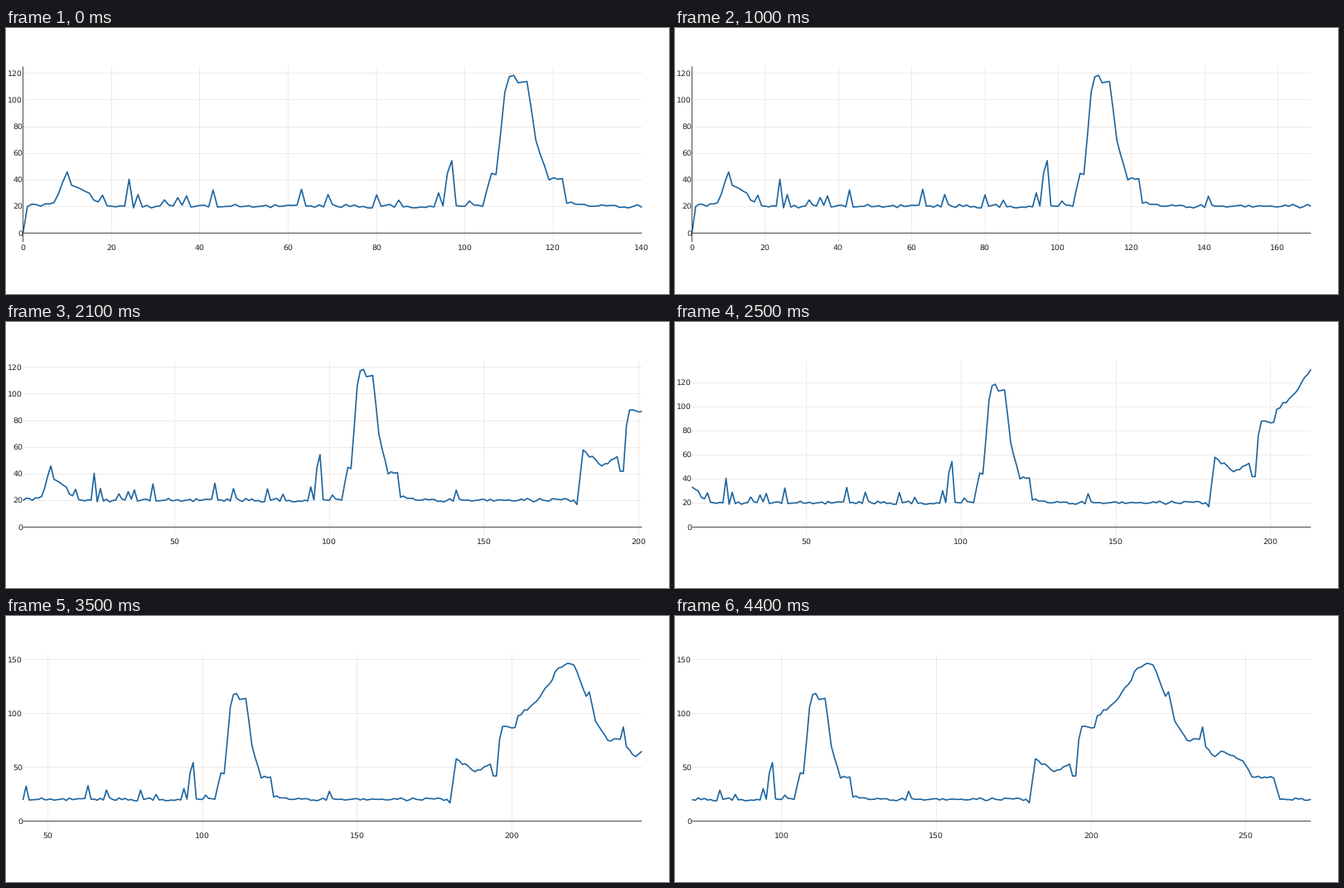
A matplotlib script for the animation above (4500 ms loop, 800x321 px).

```python
import numpy as np
import matplotlib.pyplot as plt
from matplotlib.animation import FuncAnimation

W, H, DPI = 800, 321, 100
LEFT, RIGHT, TOP, BOTTOM = 20.5, 767.3, 46.5, 258.2
FRAMES, INTERVAL = 45, 100
SAMPLES, WINDOW, QUIET = 272, 200, 20.3
BLUE, DARK, GRID, INK = "#1c649f", "#4a4a4a", "#ebebeb", "#222222"

plt.rcParams["font.family"] = "DejaVu Sans"
plt.rcParams["text.hinting"] = "none"

# Corners of the broad shapes; everything between is a jittered straight run
OUTLINE = [
    (0, 0), (1, 20), (7, 23), (10, 46), (11, 36), (14, 31.5), (17, 23.5),
    (20, QUIET),
    (104, QUIET), (106, 45), (107, 44), (109, 106), (110, 117.5),
    (111, 118.6), (112, 113), (114, 114), (116, 70), (119, 40), (122, 41),
    (123, 22.5), (128, QUIET),
    (179, QUIET), (180, 17), (182, 58), (188, 46), (193, 53), (194, 42),
    (195, 42), (196, 76), (197, 88), (201, 87), (202, 98), (207, 109),
    (213, 131), (214, 139), (218, 146.6), (220, 145), (224, 116), (225, 120),
    (227, 93), (231, 75), (235, 76), (240, 60), (242, 65), (249, 56),
    (252, 41), (259, 40), (261, QUIET),
]
# One-sample peaks
SPIKES = {18: 28.5, 24: 40.5, 26: 29, 32: 25, 35: 26.7, 37: 28, 43: 32.5,
          63: 33, 69: 29, 80: 28.8, 85: 24.8, 94: 30.3, 96: 45, 97: 54.5,
          101: 24.2, 141: 27.8, 236: 87.5}


def make_series():
    rng = np.random.default_rng(4)
    at, level = np.array(OUTLINE).T
    y = np.interp(np.arange(SAMPLES), at, level)
    y += np.clip(rng.normal(0, 0.8, SAMPLES), -1.3, 1.3)
    y[at.astype(int)] = level
    y[list(SPIKES)] = list(SPIKES.values())
    return y


series = make_series()


def last_index(i):
    """Newest sample on show: a steady feed that quickens near the end."""
    return int(round(np.interp(i, [0, 39, 44], [140, 253.3, 271])))


def ticks(lo, hi, step):
    return np.arange(np.ceil(lo / step) * step, hi + 1e-6, step)


fig = plt.figure(figsize=(W / DPI, H / DPI), dpi=DPI, facecolor="white")
ax = fig.add_axes([0, 0, 1, 1])


def stroke(x, y, color, width, z):
    ax.plot(x, y, color=color, lw=width * 72 / DPI, zorder=z, snap=False,
            solid_capstyle="butt", solid_joinstyle="round")


def h_rule(y, color, z):
    y = np.floor(y) + 0.5
    stroke([LEFT, RIGHT], [y, y], color, 1, z)


def v_rule(x, color, z):
    x = np.floor(x) + 0.5
    stroke([x, x], [TOP, BOTTOM], color, 1, z)


def label(x, y, value, ha):
    ax.text(x, y, f"{value:.0f}", ha=ha, va="baseline", color=INK,
            fontsize=9.4 * 72 / DPI)


def draw(i):
    ax.clear()
    ax.set(xlim=(0, W), ylim=(H, 0))
    ax.axis("off")

    end = last_index(i)
    start = max(0, end - WINDOW)
    peak = series[:end + 1].max()
    y_lo, y_hi = -peak / 18, peak * 19 / 18

    def px(x):
        return LEFT + (x - start) * (RIGHT - LEFT) / (end - start)

    def py(y):
        return BOTTOM - (y - y_lo) * (BOTTOM - TOP) / (y_hi - y_lo)

    for t in ticks(start, end, 20 if end - start < WINDOW else 50):
        x = px(t)
        if LEFT + 1 < x < RIGHT - 1:
            v_rule(x, GRID, 1)
        label(x - 0.3, 267.9, t, "center")

    for t in ticks(0, y_hi, 20 if y_hi - y_lo < 155 else 50):
        y = py(t)
        if t:
            h_rule(y, GRID, 1)
        label(20, y + 2.8, t, "right")

    h_rule(py(0), DARK, 2)
    if start == 0:
        v_rule(LEFT, DARK, 2)

    x = np.arange(start, end + 1)
    stroke(px(x), py(series[x]), BLUE, 1.65, 3)
    return ax.get_children()


anim = FuncAnimation(fig, draw, frames=FRAMES, interval=INTERVAL,
                     init_func=lambda: draw(0), repeat=True, repeat_delay=0)
plt.show()
```
